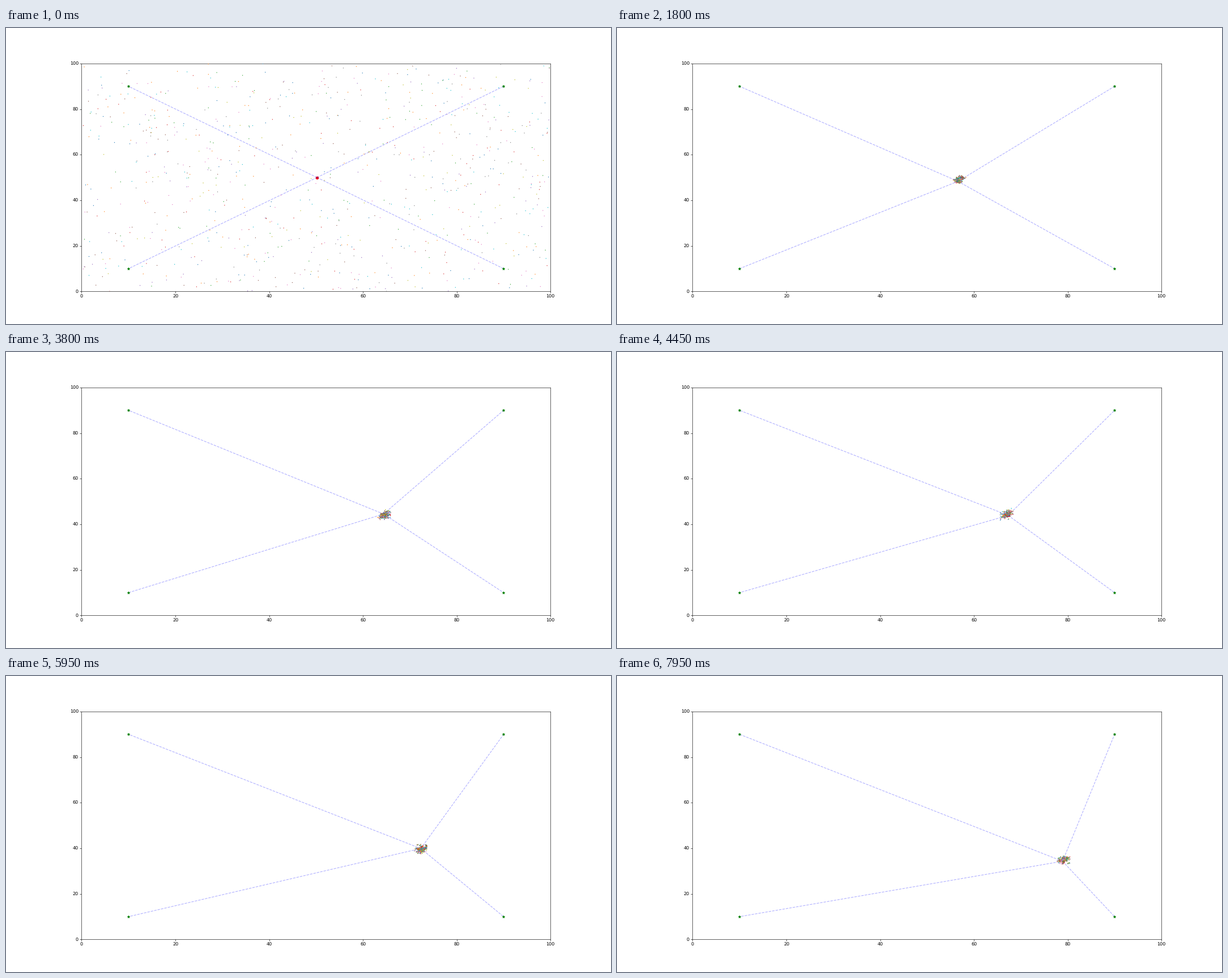
A matplotlib script that plays this animation: 1068 by 524 pixels, repeating every 8 s.

```python
import numpy as np
import matplotlib.pyplot as plt
from matplotlib.animation import FuncAnimation

W, H, DPI = 1068, 524, 55.625
FRAMES, INTERVAL = 160, 50
LANDMARKS = [(x, y) for x in (10, 90) for y in (10, 90)]
N_START, N_CLOUD, N_CLUMPS = 850, 320, 90
SPREAD, CORR = (0.55, 0.8), 0.45

# Robot waypoints: seconds, x, y
PATH = np.array([(0, 50.2, 50), (1.8, 56.6, 48.3), (2.9, 61.8, 47.6),
                 (3.8, 64.4, 44.5), (5.1, 70.2, 43.3), (6.85, 74.6, 36.3),
                 (7.95, 78.9, 34.3)])
PALETTE = np.array(plt.get_cmap("tab10").colors)


def robot_at(t):
    return np.array([np.interp(t, PATH[:, 0], PATH[:, k]) for k in (1, 2)])


def wave(t, peak, period):
    return np.cos(2 * np.pi * (t - peak) / period)


def particles(frame):
    """Uniform at first, then a tight clumpy cloud drifting around the robot."""
    rng = np.random.default_rng(100 + frame)
    if frame == 0:
        points = rng.uniform(0, 100, (N_START, 2))
    else:
        t = frame * INTERVAL / 1000
        drift = (0.45 * wave(t, 3.8, 2.07) - 0.15, 0.85 * wave(t, 1.8, 3.08))
        widen = 1 + 2.5 * np.exp(-(frame - 1) / 0.8)
        clumps = rng.multivariate_normal((0, 0), [(1, CORR), (CORR, 1)],
                                         N_CLUMPS)
        shape = (clumps[rng.integers(0, N_CLUMPS, N_CLOUD)]
                 + rng.normal(0, 0.25, (N_CLOUD, 2)))
        points = robot_at(t) + drift + widen * shape * SPREAD
    return points, PALETTE[rng.integers(0, len(PALETTE), len(points))]


plt.rcParams.update({
    "font.family": "DejaVu Sans",
    "text.hinting": "none",
    "text.hinting_factor": 1,
})
fig, ax = plt.subplots(figsize=((W + 1e-6) / DPI, (H + 1e-6) / DPI), dpi=DPI)
fig.subplots_adjust(left=133.45 / W)
ax.set(xlim=(0, 100), ylim=(0, 100))

ax.plot(*zip(*LANDMARKS), "g*", ms=6, zorder=3)
robot, = ax.plot([], [], "ro", ms=6, zorder=2)
rays = [ax.plot([], [], "b--", lw=1.5, alpha=0.3, zorder=2.5)[0]
        for _ in LANDMARKS]
cloud = ax.scatter([], [], linewidths=0, zorder=4)


def update(frame):
    x, y = robot_at(frame * INTERVAL / 1000)
    robot.set_data([x], [y])
    for ray, (lx, ly) in zip(rays, LANDMARKS):
        ray.set_data([x, lx], [y, ly])
    points, colors = particles(frame)
    cloud.set_offsets(points)
    cloud.set_facecolors(colors)
    cloud.set_sizes([3 if frame == 0 else 4])
    return [robot, cloud, *rays]


anim = FuncAnimation(fig, update, frames=FRAMES, interval=INTERVAL,
                     repeat=True, repeat_delay=0, blit=False)
plt.show()
```
